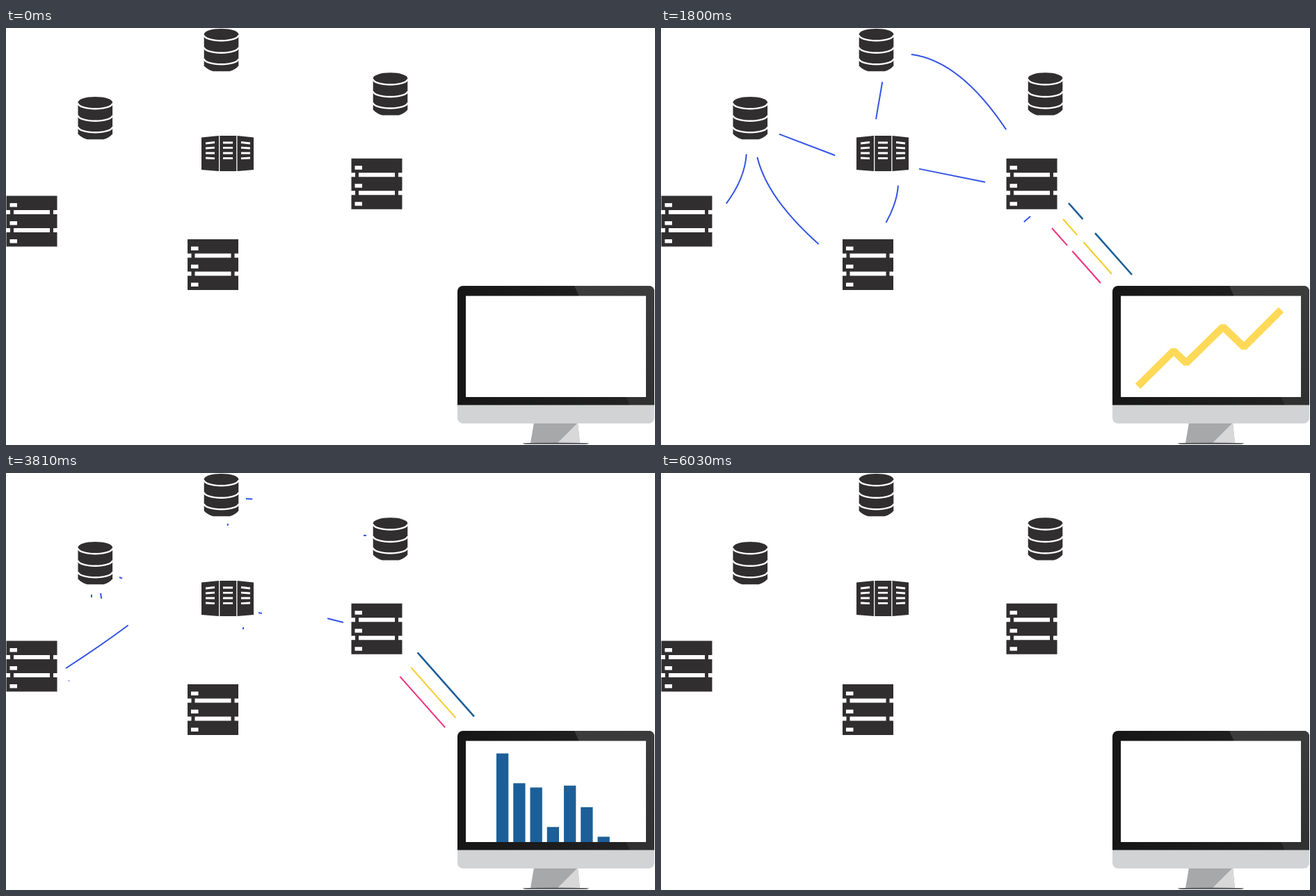
These frames come from a looping animation (933 px wide and 600 px high, 6.18 s). An HTML page:

```html
<!DOCTYPE html>
<html lang="en">
<head>
<meta charset="utf-8">
<title>Data flow</title>
<style>
html, body { margin: 0; width: 100%; height: 100%; overflow: hidden; background: #fff; }
svg { display: block; width: 933px; height: 600px; }
#links path, #feeds path { fill: none; stroke-width: 2; }
#links { stroke: #3353e8; }
</style>
</head>
<body>
<svg viewBox="0 0 933 600">
  <defs>
    <g id="db">
      <path fill="#302e2f" d="M0 8.500a24.800 8.300 0 0 1 49.600 0V53.500Q46 58.500 37 61.500H13Q4 58.500 0 53.500z"/>
      <path fill="none" stroke="#fff" stroke-width="2.400" d="M0 9.500a24.800 8 0 0 0 49.600 0M0 27a24.800 8 0 0 0 49.600 0M0 43.500a24.800 8 0 0 0 49.600 0"/>
    </g>
    <g id="server">
      <path fill="#302e2f" d="M0 0h73v20.500H0zM0 26.500h73v20H0zM0 52.500h73v20.500H0zM5.500 20h5v33h-5zM62.500 20h5v33h-5z"/>
      <path fill="#fff" d="M5 10.500h10.500v5.500H5zM5 36.500h10.500v5.500H5zM5 62.500h10.500v5.500H5z"/>
    </g>
    <linearGradient id="dark"><stop stop-color="#161616"/><stop offset="1" stop-color="#242424"/></linearGradient>
    <linearGradient id="shine" x2="0" y2="1"><stop stop-color="#3c3c3c"/><stop offset="1" stop-color="#303030"/></linearGradient>
    <clipPath id="case"><rect x="649" y="371" width="283" height="198" rx="8"/></clipPath>
  </defs>

  <use href="#db" x="284.700" y="0.700"/>
  <use href="#db" x="103.500" y="98.700"/>
  <use href="#db" x="527.700" y="64"/>
  <use href="#server" x="0.500" y="241.400"/>
  <use href="#server" x="261" y="304"/>
  <use href="#server" x="496.500" y="187.800"/>
  <path fill="#302e2f" d="M281 157.500L306 155V206L281 204zM307.300 155H331.200V206H307.300zM332.500 155L356 157.500V204L332.500 206z"/>
  <path stroke="#fff" stroke-width="2.800" d="M287 166l13-1.500M287 173l13-.8M287 180h13M287 187l13 .6M312 165h14M312 172.300h14M312 180h14M312 187.300h14M338 164.500l13 1.500M338 172.200l13 .8M338 180h13M338 187.600l13-.6"/>

  <path fill="#a7a8aa" d="M759 568H822L825 597H754z"/>
  <path fill="#d8d8d9" d="M822 568L825 597H793z"/>
  <path fill="#606164" d="M743 597.300Q790 595.500 838 597.300Q837 599 833 599H748Q744 599 743 597.300z"/>
  <g clip-path="url(#case)">
    <path fill="url(#dark)" d="M649 371h283v172H649z"/>
    <path fill="url(#shine)" d="M817 371H932V543H897z"/>
    <path fill="#d2d3d4" d="M649 542.500h283V569H649z"/>
  </g>
  <path fill="#fff" d="M661 385.500h259V531H661z"/>

  <g id="bars" fill="#1c5f98"></g>
  <path id="trend" pathLength="1" fill="none" stroke="#ffd957" stroke-width="10.500" stroke-linejoin="bevel" d="M685.500 515.500L737 464.500L755 482L808 430L838 459L891.500 405.500"/>
  <g id="links"></g>
  <g id="feeds"></g>
</svg>
<script>
const LOOP = 6180, CYCLE = 1590;
const $ = id => document.getElementById(id);

function add(parent, tag, attrs) {
  const el = document.createElementNS('http://www.w3.org/2000/svg', tag);
  for (const k in attrs) el.setAttribute(k, attrs[k]);
  return $(parent).appendChild(el);
}

// Progress of t from a to b, held within 0..1
const part = (t, a, b) => Math.min(1, Math.max(0, (t - a) / (b - a)));
const mix = (a, b, p) => a + (b - a) * p;

function trim(el, tail, head) {
  const on = head > tail;
  el.style.display = on ? '' : 'none';
  if (on) el.setAttribute('stroke-dasharray', `0 ${tail} ${head - tail} 2`);
}

// Waves give [tail, head] of a link within one cycle.
// Requests: a larger lag leaves later and travels more slowly.
const ask = lag => t => [
  part(t, 760 + 500 * lag, 1456 + 50 * lag),
  part(t, 525 + 200 * lag, 825 + 510 * lag ** 3)
];
const reply = t => [part(t, 1710, 2241), part(t, 970, 1950) ** .4];
const relay = t => [part(t, 1349, 1829), part(t, 964, 1470)];

const links = [
  ['M86 281Q300 142 306 70', ask(0)],
  ['M485 215L366 185', ask(.28)],
  ['M518 90Q385 81 318 139', ask(.5)],
  ['M90 299Q227 302 315 222', ask(.52)],
  ['M323.500 69L328 146', ask(.85)],
  ['M338 69L485 208', ask(.95)],
  ['M164 133L273 180', ask(1)],
  ['M296 293L151 166', ask(1)],
  ['M486 225Q300 268 95 288', ask(1)],
  ['M517 180Q435 37 345 37', reply],
  ['M307 143L319 73', reply],
  ['M268 190L163 150', reply],
  ['M83 266Q123 220 123 175', reply],
  ['M253 333Q146 248 136 173', reply],
  ['M317 291Q341 253 341 222', reply],
  ['M487 226L363 201', reply],
  ['M346 338Q460 335 531 271', relay]
].map(([d, wave]) => ({
  wave, els: [0, 1, 2].map(() => add('links', 'path', { d, pathLength: 1 }))
}));

// Feeds stream steadily, cut at a fixed beat by gaps that swell and shrink
const TRAVEL = 450, STREAM_END = 3950;
const cut = k => 310 + 434 * k;
const gap = t => 90 * Math.abs(Math.cos(t / 1850));
const feeds = [];

function feed(d, stroke, width, spread) {
  const pulse = (head, tail) => feeds.push({
    head, tail, el: add('feeds', 'path', { d, stroke, pathLength: 1, style: `stroke-width:${width}` })
  });
  let head = 30;
  for (let k = 0; head < STREAM_END; k++) {
    pulse(head, Math.min(cut(k), STREAM_END));
    head = cut(k) + spread * gap(cut(k));
  }
  pulse(4400, 4700);
}
feed('M586 252L677 355', '#1b5e98', 2.6, 1.5);
feed('M578 275L648 354', '#f5cd2d', 2.1, 1);
feed('M562 288L632 367', '#ee3482', 2.1, .8);

// Bars grow after a delay, then settle towards a common level
const BASE = 531, LEVEL = 85;
const delays = [0, 0, 130, 0, 135, 0, 570];
const bars = [129.5, 86, 100.5, 22, 105, 51, 81.5].map((height, i) => ({
  height, from: 3180 + delays[i],
  el: add('bars', 'rect', { x: 705 + 24.25 * i, width: 17.3 })
}));

function draw(t) {
  // The last cycle runs slightly faster
  const u = t + Math.max(0, t - 3810) * .08;
  for (const { els, wave } of links)
    els.forEach((el, i) => trim(el, ...wave(u - i * CYCLE)));

  for (const { el, head, tail } of feeds)
    trim(el, part(t, tail, tail + TRAVEL), part(t, head, head + TRAVEL));

  if (t < 3000) trim($('trend'), part(t, 1810, 2350), part(t, 570, 1090));
  else trim($('trend'), 0, t < 3180 ? part(t, 3040, 3560) : 0);

  for (const { el, height, from } of bars) {
    const settled = mix(height, LEVEL, .55 * part(t, 4440, 5310));
    const h = settled * part(t, from, from + 640) * (1 - part(t, 5820, 6030));
    el.setAttribute('y', BASE - h);
    el.setAttribute('height', h);
  }
}

const start = performance.now();
function tick() {
  const t = (performance.now() - start) % LOOP;
  draw(Math.floor(t / 30) * 30);
  requestAnimationFrame(tick);
}
draw(0);
requestAnimationFrame(tick);
</script>
</body>
</html>
```
